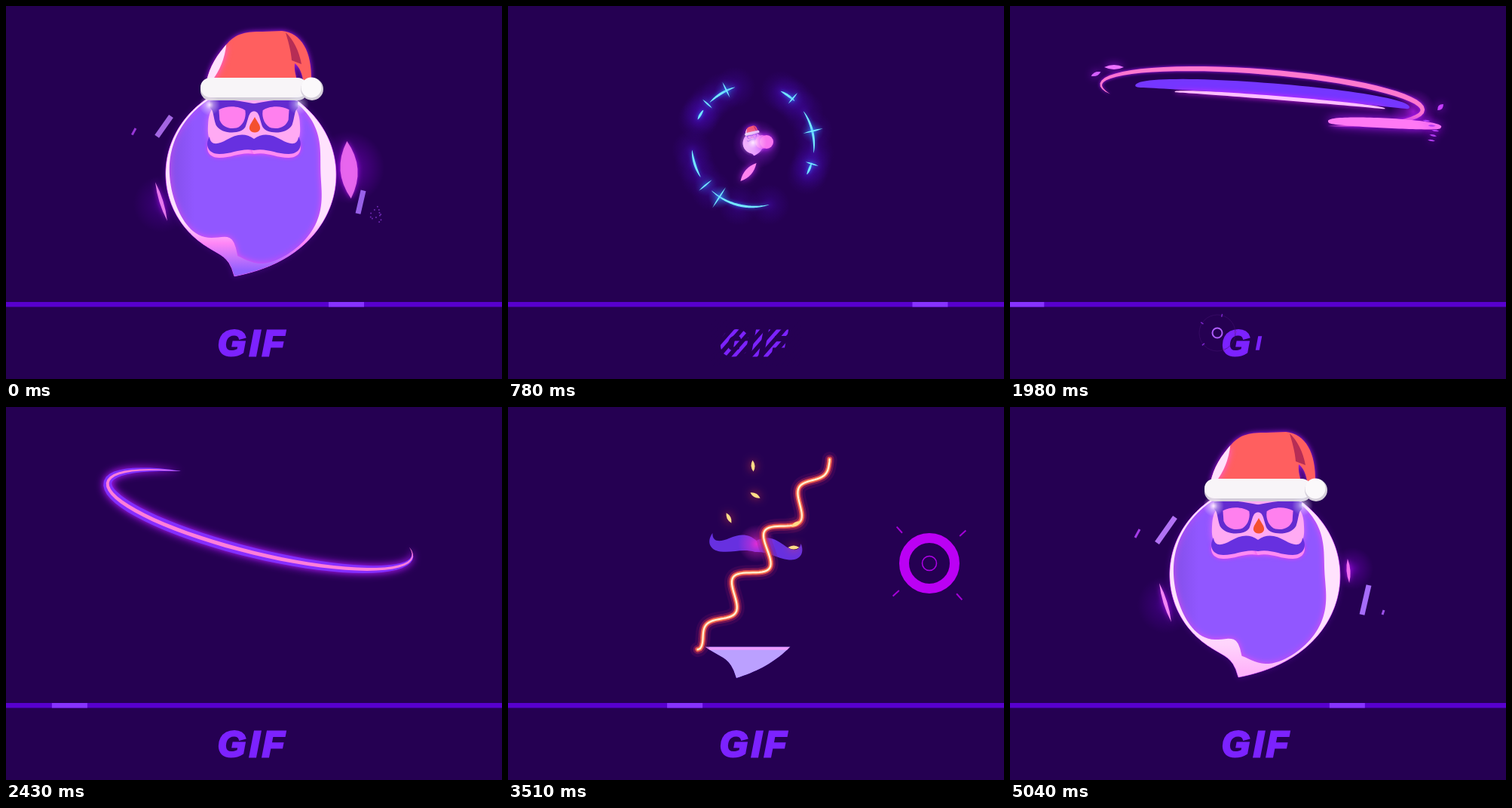
An HTML page with a canvas that plays this animation: 658 px wide and 494 px high, repeating every 5070 ms.

```html
<!DOCTYPE html>
<html lang="en">
<head>
<meta charset="utf-8">
<title>GIF</title>
<style>
html, body { margin: 0; width: 100%; height: 100%; overflow: hidden; background: #250052; }
canvas { display: block; width: 658px; height: 494px; }
</style>
</head>
<body>
<canvas id="stage" width="658" height="494"></canvas>
<script>
const ctx = document.getElementById('stage').getContext('2d');
const LOOP = 5070, STEP = 30, BG = '#250052';
const { PI, sin, cos, exp } = Math, TAU = PI * 2;

// ---------- helpers ----------
const part = (t, a, b) => Math.max(0, Math.min(1, (t - a) / (b - a)));
const smooth = k => k * k * (3 - 2 * k);
const ease = (t, a, b) => smooth(part(t, a, b));
const lerp = (a, b, k) => a + (b - a) * k;
const pulse = (t, a, m, b) => t < m ? ease(t, a, m) : 1 - ease(t, m, b);
const back = k => 1 + 2.7 * (k - 1) ** 3 + 1.7 * (k - 1) ** 2;
const noise = i => { const s = sin(i * 127.1 + 3.7) * 43758.5453; return s - Math.floor(s); };
const spow = (v, e) => Math.sign(v) * Math.abs(v) ** e;
const bump = (a, mid, w) => {
  const d = Math.atan2(sin(a - mid), cos(a - mid));
  return exp(-((d / w) ** 2));
};

function scoped(draw) { ctx.save(); draw(); ctx.restore(); }

function place(x, y, s, a, draw) {
  scoped(() => { ctx.translate(x, y); ctx.rotate(a); ctx.scale(s, s); draw(); });
}

function faded(alpha, draw) {
  if (alpha > 0) scoped(() => { ctx.globalAlpha *= alpha; draw(); });
}

function lit(color, blur) { ctx.shadowColor = color; ctx.shadowBlur = blur; }

function fill(path, color, rule = 'nonzero') { ctx.fillStyle = color; ctx.fill(path, rule); }

function glow(x, y, r, rgb, alpha) {
  const g = ctx.createRadialGradient(x, y, 0, x, y, r);
  g.addColorStop(0, `rgba(${rgb},${alpha})`);
  g.addColorStop(.4, `rgba(${rgb},${alpha * .45})`);
  g.addColorStop(1, `rgba(${rgb},0)`);
  ctx.fillStyle = g;
  ctx.fillRect(x - r, y - r, 2 * r, 2 * r);
}

function line(x1, y1, x2, y2, w, color) {
  ctx.strokeStyle = color; ctx.lineWidth = w;
  ctx.beginPath(); ctx.moveTo(x1, y1); ctx.lineTo(x2, y2); ctx.stroke();
}

function disc(x, y, r, color) {
  ctx.fillStyle = color;
  ctx.beginPath(); ctx.arc(x, y, r, 0, TAU); ctx.fill();
}

function ring(x, y, r, w, color) {
  ctx.strokeStyle = color; ctx.lineWidth = w;
  ctx.beginPath(); ctx.arc(x, y, r, 0, TAU); ctx.stroke();
}

function rays(x, y, n, r1, r2, w, color, turn = 0) {
  for (let i = 0; i < n; i++) {
    const a = turn + i * TAU / n, c = cos(a), s = sin(a);
    line(x + c * r1, y + s * r1, x + c * r2, y + s * r2, w, color);
  }
}

// Closed outline through at(0..1).
function outline(at, n = 160) {
  const path = new Path2D();
  for (let i = 0; i < n; i++) path.lineTo(...at(i / n));
  path.closePath();
  return path;
}

function leaf(x, y, len, w, a, color) {
  place(x, y, 1, a, () => {
    const h = len / 2;
    fill(new Path2D(`M${-h} 0Q0 ${-w} ${h} 0Q0 ${w} ${-h} 0`), color);
  });
}

// Tapered stroke along at(k), for k from a to b.
function ribbon(at, a, b, w, color) {
  if (b - a < .01) return;
  const left = [], right = [], n = 48;
  for (let i = 0; i <= n; i++) {
    const k = lerp(a, b, i / n), [x, y] = at(k), [x1, y1] = at(k - .005), [x2, y2] = at(k + .005);
    const h = w / 2 * sin(PI * i / n) ** .65 / (Math.hypot(x2 - x1, y2 - y1) || 1);
    left.push([x - (y2 - y1) * h, y + (x2 - x1) * h]);
    right.unshift([x + (y2 - y1) * h, y - (x2 - x1) * h]);
  }
  ctx.fillStyle = color;
  ctx.beginPath();
  left.concat(right).forEach(p => ctx.lineTo(...p));
  ctx.fill();
}

const orbit = (cx, cy, rx, ry, tilt, from = PI, to = TAU) => k => {
  const a = lerp(from, to, k), x = rx * cos(a), y = ry * sin(a);
  return [cx + x * cos(tilt) - y * sin(tilt), cy + x * sin(tilt) + y * cos(tilt)];
};

// Ribbon that runs in until `peak`, then lets its tail catch up.
function sweep(t, start, peak, end, at, w, color, blur = 0, halo = '#b419ff') {
  scoped(() => {
    lit(halo, blur);
    ribbon(at, ease(t, peak, end), ease(t, start, peak), w, color);
  });
}

// ---------- character ----------
const HALF_STACHE = new Path2D('M0-5C-12-14-24-11-36-4C-48 3-58 4-59-8C-66 4-60 15-46 15C-28 15-18 7 0 10C4 6 4 0 0-5Z');
const FRAME = new Path2D('M-60-22C-40-26-20-22 1-18L1-8C-8-8-7 2-12 14C-18 24-45 24-52 11C-56 0-55-9-60-12Z');
const LENS = new Path2D('M-48-10C-35-17-18-14-12-9C-10 2-16 13-24 15C-36 17-44 12-47 4Z');
const HAT = new Path2D('M266 100C270 80 280 64 296 47C308 36 318 34 340 34L366 33C392 36 406 60 405 100L394 98C392 84 386 78 383 76C382 86 385 92 386 100Z');
const FOLD = new Path2D('M371 35C381 44 389 60 392 77L379 72C378 58 374 46 371 35Z');
const NOSE = new Path2D('M330 147C333 153 338 158 337 163C335 169 325 169 323 163C322 158 327 153 330 147Z');

// Round body with a tail tip at (303, 358); inset(a) shrinks the radius.
function bodyShape(k, inset = () => 0) {
  const cx = lerp(315, 324.5, k), cy = 222, tip = Math.atan2(136, 303 - cx);
  return outline(f => {
    const d = f < .5 ? f * TAU : (f - 1) * TAU, a = tip + d;
    const tail = 25 * exp(d < 0 ? d / .5 : -d / .08);
    const r = (112.5 + tail + 5 * bump(a, -PI / 2, .6)) * (1 - inset(a));
    return [cx + r * cos(a), cy + r * sin(a)];
  });
}

function faceShape(k) {
  const cy = lerp(198, 158, k), rx = lerp(72, 61, k), ry = lerp(34, 38, k), grow = lerp(.06, .03, k);
  return outline(f => {
    const a = f * TAU, c = spow(cos(a), .7), s = spow(sin(a), .7);
    const notch = s > 0 ? lerp(6, 3, k) * exp(-c * c * 8) : 0;
    return [lerp(323, 329, k) + rx * c * (1 + grow * s), cy + ry * s - notch];
  });
}

function both(draw) { draw(); ctx.scale(-1, 1); draw(); }

function mustache(x, y, s, a, grow = 1, color = '#6730e0') {
  place(x, y, s, a, () => {
    fill(HALF_STACHE, color);
    ctx.scale(-grow, 1);
    if (grow) fill(HALF_STACHE, color);
  });
}

function hat(u) {
  const k = back(part(u, 4440, 4680));
  if (u <= 4440) return;
  scoped(() => {
    ctx.translate(330, 124 - 40 * (1 - ease(u, 4440, 4600)));
    ctx.scale(k, k);
    ctx.translate(-330, -124);
    const shine = ease(u, 4700, 4980);
    scoped(() => {
      lit(`rgba(180,30,255,${shine})`, 7);
      fill(HAT, '#ff5f5f');
    });
    fill(FOLD, '#b62d55');
    faded(shine, () => {
      ctx.clip(HAT);
      lit('#ff58ee', 10);
      leaf(273, 84, 78, 17, -1.05, '#ffe0fc');
    });
    for (const [y, h, c] of [[96, 29, '#d3cdd9'], [95, 26, '#f8f5f8']]) {
      ctx.fillStyle = c;
      ctx.beginPath(); ctx.roundRect(258, y, 142, h, 13); ctx.fill();
    }
    disc(406, 110, 15, '#d5cfda');
    disc(405, 108, 13.5, '#fbf9fb');
  });
}

function rimLight(body, k, u) {
  faded(ease(u, 4650, 4980), () => {
    const sway = .15 * sin((u - LOOP) / 220);
    const inner = bodyShape(k, a => .02 + .16 * bump(a, -.02 + sway, .55)
      + .03 * bump(a, 2.9 - sway, .5) + .21 * bump(a, 1.85 + sway, .3));
    const rim = new Path2D(body);
    rim.addPath(inner);
    scoped(() => {
      lit('#9a18ff', 7);
      ctx.strokeStyle = '#dc5cff'; ctx.lineWidth = 1; ctx.stroke(body);
    });
    ctx.clip(body);
    lit('#f04df2', 9);
    const g = ctx.createLinearGradient(0, 285, 0, 350);
    g.addColorStop(0, '#ffe2fd');
    g.addColorStop(.45, u < LOOP ? '#ffd4fc' : '#ff86f6');
    g.addColorStop(1, u < LOOP ? '#ffb4fa' : '#9460ff');
    fill(rim, g, 'evenodd');
    faded(ease(u, 5250, 5560), () => fill(body, '#ffc5fc'));
  });
}

function character(u) {
  if (u < 3436 || u > 5900) return;
  const shrink = ease(u, 5390, 5800), s = lerp(1, .12, shrink) * (1 - part(u, 5850, 5900));
  const k = ease(u, 4400, 4850), fresh = 1 - ease(u, 3436, 3900), lamp = ease(u, 4650, 4980);
  const body = bodyShape(k);
  scoped(() => {
    ctx.translate(325, lerp(215, 181, shrink));
    ctx.rotate(-.22 * shrink);
    ctx.scale(s, s);
    ctx.translate(-325, -215);

    const top = lerp(358, 95, part(u, 3436, 3920));
    scoped(() => {
      ctx.translate(303, 0); ctx.scale(1 - .14 * fresh, 1); ctx.translate(-303, 0);
      ctx.beginPath(); ctx.rect(0, top, 658, 500); ctx.clip();
      const g = ctx.createLinearGradient(205, 0, 250, 0);
      g.addColorStop(0, '#7f4ce0');
      g.addColorStop(1, '#9157ff');
      fill(body, g);
      faded(fresh, () => {
        ctx.clip(body);
        fill(body, '#bea6ff');
        ctx.fillStyle = '#f09cff';
        ctx.fillRect(190, top, 260, 4);
      });
    });
    rimLight(body, k, u);

    const f = ease(u, 3820, 4050);
    place(325, 190, f, 0, () => {
      ctx.translate(-325, -190);
      lit('#e060ff', 4 + 5 * lamp);
      fill(faceShape(k), '#ffaaf3');
    });
    if (u > 3960) place(329, 147, lerp(1.04, .97, k) * back(part(u, 3960, 4140)), 0, () => both(() => {
      fill(FRAME, '#632bd0');
      fill(LENS, '#ff80ee');
    }));
    if (u > 4250) fill(NOSE, '#f4502f');
    if (u > 3600) {
      faded(lamp, () => scoped(() => {
        lit('#e838f4', 5);
        mustache(329, 186, 1, 0, 1, '#ff8cf2');
      }));
      mustache(329, 181, 1, lerp(.12, 0, ease(u, 3600, 3900)));
    }
    hat(u);
    const star = pulse(u, 4850, 5040, 5250);
    glow(270, 131, 14, '255,235,255', star);
    glow(388, 130, 14, '235,235,255', star * .8);
  });
}

function flares(u) {
  faded(pulse(u, 4850, 5040, 5190), () => {
    const flash = part(u, 5040, 5070), cut = 1 - part(u, 5040, 5180);
    glow(207, 262, 38, '100,0,190', .55);
    glow(454, 214, 28 + 20 * flash, '130,0,210', .6 + .3 * flash);
    scoped(() => {
      lit('#b010f0', 6);
      leaf(206, 259, 54, 5, 1.27, '#f486f4');
      leaf(lerp(449, 455, flash), 217, lerp(32, 76, flash), lerp(5, 23, flash), 1.5, '#f070f0');
    });
    line(219, 146, lerp(219, 195, cut), lerp(146, 180, cut), 7, '#b272f4');
    line(172, 162, 172 - 6 * cut, 162 + 11 * cut, 3, '#a43ce8');
    line(467, 275, lerp(467, 476, cut), lerp(275, 236, cut), 7, '#a66cfa');
    if (!flash) line(496, 269, 494, 275, 3, '#9b51e8');
    else for (let i = 0; i < 12; i++) {
      const a = i * 2.4, r = 4 + 8 * noise(i);
      disc(492 + r * cos(a), 276 + r * sin(a), 1, '#7a2fc0');
    }
  });
}

// ---------- effects ----------
// Broken ring of sparks: start and end angle, angle of the crossing glint.
const SPARKS = [[-2.36, -1.87, -2.02], [-2.7, -2.52, -2.4], [-1.1, -.82, -.87], [-.6, .12, -.24],
  [.28, .49, .3], [1.3, 2.32, 2.15], [2.6, 3.07, 2.45]];

function electricity(t) {
  faded(pulse(t, 620, 770, 930), () => place(325, 185, lerp(.7, 1, ease(t, 620, 780)) + part(t, 780, 930) * .2, 0, () => {
    for (const [a, b, c] of SPARKS) {
      for (const q of [a, (a + b) / 2, b]) glow(81 * cos(q), 81 * sin(q), 27, '75,10,200', .4);
      glow(81 * cos(c), 81 * sin(c), 15, '50,130,235', (b - a) * .7);
    }
    lit('#2a7cff', 5);
    for (const [a, b, c] of SPARKS) {
      const len = 7 + 9 * (b - a);
      ribbon(orbit(0, 0, 81, 81, 0, a, b), 0, 1, 3, '#75eaff');
      leaf(82 * cos(c), 82 * sin(c), len * 2, 2, c, '#75eaff');
    }
  }));
}

function droplet(t) {
  faded(pulse(t, 690, 780, 900), () => {
    glow(330, 183, 32, '180,40,255', .7);
    scoped(() => {
      lit('#c626ff', 10);
      for (const x of [337, 343]) disc(x, 180, 9, '#f874ee');
      leaf(319, 220, 32, 9, -.85, '#ff83ef');
    });
    glow(325, 181, 18, '255,235,255', 1);
  });
}

function ribbons(t) {
  const pink = '#ff7fd9', violet = '#7536ff', tilt = .08;
  // Wide loops before and after the big arch, each flatter than the last.
  for (let i = 0; i < 4; i++) {
    const late = i === 3, start = late ? 2140 : 850 + i * 270, turn = i * 2;
    const at = orbit(325 + i * 4, 185 - i * 12, 70 + i * 46, 75 - i * 10, tilt * i, turn, turn + 4.4);
    sweep(t, start, start + 260, start + 510, at, 14, violet, 12);
    sweep(t, start + 20, start + 280, start + 530, at, 5, pink, 8);
  }
  faded(pulse(t, 1830, 1980, 2130), () => glow(535, 140, 30, '200,30,255', .7));
  sweep(t, 1690, 1980, 2170, orbit(348, 121, 182, 10, tilt), 17, violet);
  sweep(t, 1720, 1980, 2180, orbit(358, 125, 140, 3, tilt), 5, '#ffc0ff', 7, '#e821ff');
  sweep(t, 1660, 1980, 2200, orbit(334, 121, 214, 34, tilt, 2.79, 7.42), 7, '#ff78cf', 4);
  sweep(t, 1830, 1980, 2200, orbit(497, 157, 75, 2, .05), 13, '#ff79f4', 14);

  // Comet: body, pink sheath, white core, loose drop.
  sweep(t, 2620, 2880, 3120, orbit(231, 210, 141, 3, -.04, TAU, PI), 27, '#7936ff', 7, '#7414e0');
  sweep(t, 2680, 2900, 3090, orbit(176, 207, 60, 2, -.04, TAU, PI), 16, '#f27bff', 9, '#d42bff');
  sweep(t, 2740, 2900, 3080, orbit(170, 207, 26, 3, .3, TAU, PI), 13, '#fff', 10, '#ff72ff');
  sweep(t, 2760, 2900, 3060, orbit(410, 212, 22, 1, .15), 11, '#ff9fee', 14);
  sweep(t, 2780, 2900, 3060, orbit(358, 207, 16, 1, .1), 5, '#f087ff');

  faded(pulse(t, 1880, 1980, 2110), () => {
    lit('#b419ff', 12);
    leaf(138, 81, 26, 6, 0, '#ec72ff');
    leaf(114, 90, 14, 5, -.4, '#d45fff');
    leaf(571, 134, 11, 6, -.8, '#c53dff');
    for (let i = 0; i < 5; i++)
      leaf(550 + 18 * noise(i), 152 + i * 6.5, 10, 2.5, .2 * noise(i + 9), '#b33cf4');
  });
}

function bursts(t) {
  faded(pulse(t, 2790, 2910, 3030), () => {
    const grow = lerp(.6, 1, ease(t, 2790, 2910));
    ring(155, 160, 11.5 * grow, 13 * grow, '#a83cf0');
    rays(155, 160, 20, 6, 18 * grow, 1.2, '#48108a', t / 900);
    rays(155, 160, 9, 28 * grow, 33 * grow, 3, '#a92bea', .55);
    line(lerp(330, 430, ease(t, 2910, 3030)), 188.5, lerp(330, 430, ease(t, 2780, 2900)), 188.5, 3, '#b000e8');
  });
  faded(pulse(t, 2740, 2900, 3120), () => {
    for (let i = 0; i < 8; i++) {
      const a = i * 2.4, r = 60 + 65 * noise(i) + (t - 2910) * .05;
      disc(325 + r * cos(a), 155 + r * sin(a), 1.1, '#9226d8');
    }
  });
  faded(pulse(t, 3390, 3510, 3660), () => {
    const k = part(t, 3390, 3510), out = part(t, 3510, 3660), thin = 1 - out;
    ring(559, 207, lerp(10, 33.5, smooth(k)) + out * 12, 13 * thin, '#bb00f4');
    ring(559, 207, 9.5 * k + out * 14, 1.5, '#b000e8');
    rays(559, 207, 4, 54 * k + out * 12, 65 * k + out * 8, 2, '#a500d8', .84);
  });
}

function firstMustache(t) {
  if (t < 2790 || t > 3600) return;
  const k = ease(t, 2970, 3240);
  mustache(lerp(353, 329, k), lerp(151, 182, k), lerp(1.06, 1, k) * back(part(t, 2790, 2900)), lerp(0, .12, k), k);
}

// Wave laid across the line from (250, 320) to (425, 68).
function boltAt(k) {
  const off = 2 + 17 * cos(TAU * (k - .22) / .245) * Math.max(0, sin(PI * k)) ** .5;
  return [lerp(250, 425, k) + .82 * off, lerp(320, 68, k) + .57 * off];
}

function lightning(t) {
  const b = ease(t, 3390, 3500), a = ease(t, 3530, 3660);
  if (b - a < .01) return;
  scoped(() => {
    glow(330, 181, 25, '255,45,210', .8);
    ctx.lineCap = ctx.lineJoin = 'round';
    const bolt = new Path2D();
    for (let i = 0; i <= 120; i++) bolt.lineTo(...boltAt(lerp(a, b, i / 120)));
    for (const [w, c] of [[20, 'rgba(130,20,100,.22)'], [12, 'rgba(185,38,80,.45)'], [7, '#d9474d'], [4, '#ff935f'], [2, '#fff3da']]) {
      ctx.lineWidth = w; ctx.strokeStyle = c; ctx.stroke(bolt);
    }
    const s = pulse(t, 3420, 3510, 3640), d = (t - 3510) * .08;
    lit('#ff4539', 12);
    for (const [x, y, turn] of [[325, 78, 1.5], [328, 117, .5], [293, 147, 1.1], [382, 155, -.5], [379, 186, 0]])
      leaf(x + (x - 330) * d / 40, y - d, 15 * s, 5 * s, turn, '#ffdc87');
  });
}

function noseLight(t) {
  faded(pulse(t, 4080, 4230, 4430), () => {
    glow(326, 91, 27, '45,40,230', .7);
    glow(326, 125, 30, '70,215,255', .9);
    glow(326, 150, 26, '255,255,255', .8);
    lit('#48c7ff', 8);
    for (let i = 0; i < 15; i++) {
      const drift = (t - 4230) * (.05 + noise(i + 40) * .1);
      leaf(313 + noise(i) * 25, 84 + noise(i + 20) * 66 - drift, 12 + noise(i + 60) * 18, 3, PI / 2, i % 3 ? '#7df0ff' : '#f1ffff');
    }
    leaf(331, 165, 54, 8, 1.45, '#f6ffff');
    leaf(333, 181, 24, 5, .2, '#f6ffff');
  });
}

// ---------- footer ----------
function letter(ch, x, s) {
  const half = ctx.measureText(ch).width / 2;
  place(x + half, 446, s, 0, () => {
    ctx.fillStyle = ctx.strokeStyle = '#7c22ff';
    ctx.lineWidth = 3;
    ctx.strokeText(ch, -half, 17);
    ctx.fillText(ch, -half, 17);
  });
}

function title(t) {
  ctx.font = 'italic bold 48px "Liberation Sans", Arial, sans-serif';
  if (t < 960 || t > 1860) {
    const pop = a => t < 960 ? 1 : part(t, a, a + 100);
    letter('G', 281, pop(1870));
    letter('I', 323, pop(1930));
    letter('F', 340, pop(1990));
  }
  const wipe = part(t, 580, 960);
  if (wipe && wipe < 1) scoped(() => {
    ctx.beginPath(); ctx.rect(270, 415, 120, 62); ctx.clip();
    for (let x = 200; x < 420; x += 14) line(x, 490, x + 74, 406, 11 * wipe, BG);
  });
  faded(pulse(t, 1880, 1975, 2100), () => {
    ring(275, 433, lerp(3, 6.5, ease(t, 1880, 1980)), 2, '#b05cff');
    ring(275, 433, 24, .6, '#40106f');
    rays(275, 433, 5, 22, 26, 1.5, '#7b25cb', 1.2);
  });
}

function progress(t) {
  ctx.fillStyle = '#5800ce';
  ctx.fillRect(0, 392, 658, 6.5);
  ctx.fillStyle = '#8733ff';
  ctx.fillRect((475 + 705 * t / LOOP) % 705 - 47, 392, 47, 6.5);
}

function render(t) {
  const u = t < 1000 ? t + LOOP : t;
  ctx.fillStyle = BG;
  ctx.fillRect(0, 0, 658, 494);
  flares(u);
  ribbons(t);
  bursts(t);
  character(u);
  droplet(t);
  electricity(t);
  firstMustache(t);
  lightning(t);
  noseLight(t);
  progress(t);
  title(t);
}

const began = performance.now();
function tick() {
  const t = (performance.now() - began) % LOOP;
  render(Math.floor(t / STEP) * STEP);
  requestAnimationFrame(tick);
}
tick();
</script>
</body>
</html>
```
